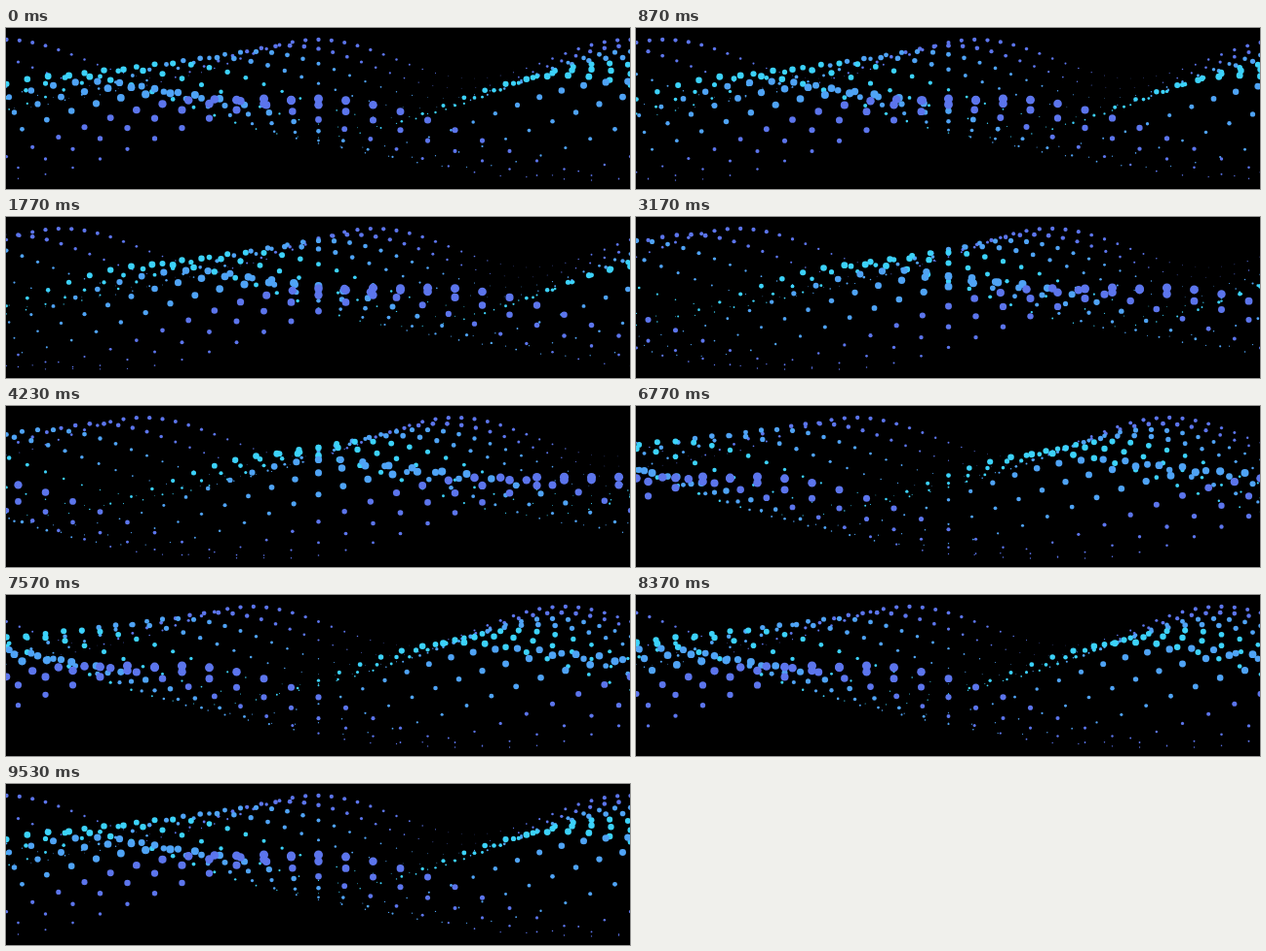
An HTML page with a canvas for the animation above (9560 ms loop, 640 px wide and 166 px high).

```html
<!DOCTYPE html>
<html lang="en">
<head>
<meta charset="utf-8">
<title>Dot wave</title>
<style>
  html, body { margin: 0; width: 100%; height: 100%; overflow: hidden; background: #000; }
  canvas { display: block; }
</style>
</head>
<body>
<canvas id="stage" width="640" height="166"></canvas>
<script>
const ctx = document.getElementById('stage').getContext('2d');
const LOOP = 9560, STEP = 40;       // the wave advances 25 times a second
const ROWS = 13, MIDDLE = 6, WAVELENGTH = 24, START = -0.1;
const PURPLE = '#5c75ec', BLUE = '#4fa3f5', CYAN = '#3cd2fa';

function rowColor(row) {
  if (row < 2 || row > 9) return PURPLE;
  return row < 4 || row > 6 ? BLUE : CYAN;
}

function drawRow(row, travel) {
  const spacing = Math.min(40 / 3 + row * 4 / 3, 28);
  const baseline = Math.min(32 + row * 8.15, 115);
  const crest = 2 * Math.abs(row - MIDDLE) - WAVELENGTH / 2 + travel;
  const reach = Math.ceil(320 / spacing);
  ctx.fillStyle = rowColor(row);
  for (let col = -reach; col <= reach; col++) {
    const height = Math.cos((col - crest) / WAVELENGTH * 2 * Math.PI);
    const radius = spacing * (0.093 + 0.069 * height);
    ctx.beginPath();
    ctx.arc(320.5 + col * spacing, baseline - 1.5 * spacing * height, radius, 0, 2 * Math.PI);
    ctx.fill();
  }
}

function draw() {
  const time = Math.round(performance.now() % LOOP / STEP) * STEP;
  const travel = START + WAVELENGTH * time / LOOP;
  ctx.clearRect(0, 0, 640, 166);
  for (let row = 0; row < ROWS; row++) drawRow(row, travel);
  requestAnimationFrame(draw);
}
draw();
</script>
</body>
</html>
```
